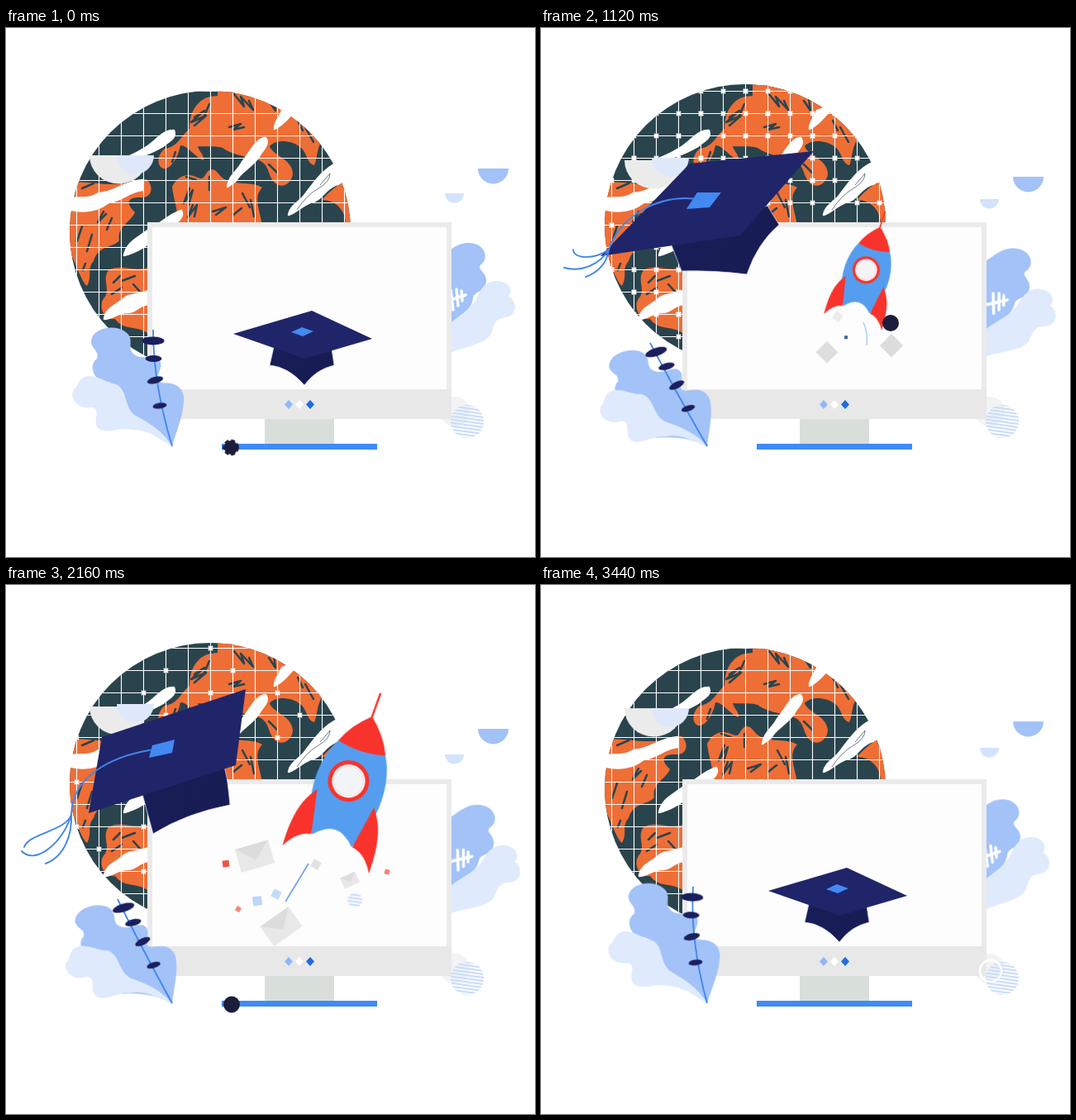
Recreate the animation shown at these times as an HTML page without scripts. Size 640 px wide and 640 px high, loop 3.52 s.

```html
<!DOCTYPE html>
<html lang="en">
<head>
<meta charset="utf-8">
<title>Graduation launch</title>
<style>
html,body{margin:0;width:100%;height:100%;overflow:hidden;background:#fff}
svg{display:block;width:100vw;height:100vh}
.anim{animation:3.52s linear infinite}

/* globe */
.mask{animation-name:mask}
@keyframes mask{0%,79.5%,100%{cy:246px}18.2%{cy:241px}31.8%{cy:238px}50%{cy:237px}61.4%{cy:240px}}
.marks{animation-name:marks}
.marks.late{animation-name:late}
@keyframes marks{0%,9%,46%,100%{opacity:0}15%,38%{opacity:1}}
@keyframes late{0%,14%,76%,100%{opacity:0}22%,66%{opacity:1}}

/* floating bowls */
.bowl{animation-name:bowl}
.bowl.lead{animation-name:lead}
@keyframes bowl{0%,100%{transform:translateY(154px)}18.2%{transform:translateY(161px)}31.8%{transform:translateY(160px)}50%{transform:translateY(153px)}61.4%{transform:translateY(147px)}79.5%{transform:translateY(144px)}97.7%{transform:translateY(149px)}}
@keyframes lead{0%,100%{transform:translateY(154px)}18.2%{transform:translateY(161px)}31.8%{transform:translateY(157px)}50%{transform:translateY(148px)}61.4%,79.5%{transform:translateY(144px)}97.7%{transform:translateY(149px)}}
.bob{animation-name:bob}
.bob.small{animation-name:bobSmall}
@keyframes bob{0%,100%{transform:translateY(170px)}18.2%{transform:translateY(177px)}31.8%{transform:translateY(180px)}50%{transform:translateY(178px)}61.4%{transform:translateY(174px)}79.5%{transform:translateY(164px)}97.7%{transform:translateY(165px)}}
@keyframes bobSmall{0%,100%{transform:translateY(200px)}18.2%{transform:translateY(205px)}31.8%,50%{transform:translateY(207px)}61.4%{transform:translateY(205px)}79.5%{transform:translateY(198px)}97.7%{transform:translateY(197px)}}

/* leaves: --a scales the swing, --s the squash */
.leaf{--a:1;--s:0;transform-origin:201px 506px;animation-name:sway;animation-timing-function:ease-in-out}
.back{--a:.72}
.front{--a:.85;--s:.08}
@keyframes sway{
0%,100%{transform:rotate(0deg) scaleY(1)}
18.2%{transform:rotate(calc(var(--a)*-9deg)) scaleY(calc(1 - var(--s)*.7))}
31.8%,50%{transform:rotate(calc(var(--a)*-13deg)) scaleY(calc(1 - var(--s)))}
61.4%{transform:rotate(calc(var(--a)*-12deg)) scaleY(calc(1 - var(--s)*.9))}
79.5%{transform:rotate(calc(var(--a)*-9.5deg)) scaleY(calc(1 - var(--s)*.7))}
97.7%{transform:rotate(calc(var(--a)*1.5deg)) scaleY(1)}}
.stalk{fill:none;stroke:#3f86f0;stroke-width:1.8;animation-name:stalk;animation-timing-function:ease-in-out}
@keyframes stalk{
0%,100%{d:path("M178 365Q178 430 201 506")}
18.2%{d:path("M139 375Q165 432 201 506")}
31.8%,50%{d:path("M132 381Q162 438 201 506")}
61.4%{d:path("M135 380Q163 437 201 506")}
79.5%{d:path("M145 376Q167 432 201 506")}
97.7%{d:path("M184 365Q180 430 201 506")}}
.bush{transform-origin:500px 410px;animation-name:bush;animation-timing-function:ease-in-out}
@keyframes bush{0%,100%{transform:rotate(0deg)}18.2%{transform:rotate(4.5deg)}31.8%,50%{transform:rotate(5.7deg)}61.4%{transform:rotate(5.2deg)}79.5%{transform:rotate(1deg)}97.7%{transform:rotate(-.6deg)}}

/* rocket */
.rocket{animation-name:launch}
@keyframes launch{
0%,13%,93%,100%{transform:translate(361px,392px) rotate(0deg) scale(0)}
18.2%{transform:translate(363px,361px) rotate(3deg) scale(.4)}
31.8%{transform:translate(395px,294px) rotate(16deg) scale(.66)}
50%{transform:translate(418px,252px) rotate(16deg) scale(.88)}
61.4%{transform:translate(417px,239px) rotate(18deg) scale(1)}
79.5%{transform:translate(405px,262px) rotate(13deg) scale(.92);animation-timing-function:ease-in}}

/* cap */
.board{fill:#20256a;animation-name:board}
@keyframes board{
0%,8%,95.5%,100%{d:path("M275 370L370 342 443 376 361 400Z")}
18.2%,87%{d:path("M169 320L280 256 391 270 304 330Z")}
31.8%{d:path("M72 276L180 164 330 149 241 251Z")}
50%{d:path("M76 276L145 162 311 129 238 249Z")}
61.4%{d:path("M100 276L116 184 290 126 278 218Z")}
79.5%{d:path("M90 276L222 180 349 182 226 275Z")}}
.skirt{fill:url(#dusk);stroke:#d3d6ee;stroke-width:.8;animation-name:skirt}
@keyframes skirt{
0%,8%,95.5%,100%{d:path("M324 386L319 408Q342 410 361 432 375 413 397 408L394 388Z")}
18.2%,87%{d:path("M237 324L236 353Q265 355 299 369 318 340 342 326L333 310Z")}
31.8%{d:path("M158 263L170 294Q208 293 249 298 262 260 288 238L274 215Z")}
50%{d:path("M155 260L166 291Q210 285 257 281 262 250 271 222L262 207Z")}
61.4%{d:path("M165 253L178 301Q218 276 271 266 269 245 267 232L264 219Z")}
79.5%{d:path("M178 273L183 308Q225 316 259 318 278 282 302 260L288 230Z")}}
.knob{fill:#4389f3;animation-name:knob}
@keyframes knob{
0%,8%,95.5%,100%{d:path("M345 368L358 362 372 367 359 373Z")}
18.2%,87%{d:path("M259 296L272 286 295 285 282 296Z")}
31.8%{d:path("M176 219L189 199 218 199 204 217Z")}
50%{d:path("M168 211L180 193 207 187 194 205Z")}
61.4%{d:path("M173 209L177 194 204 187 201 203Z")}
79.5%{d:path("M197 234L212 219 237 219 222 234Z")}}
.cord path{fill:none;stroke:#4285e8;stroke-width:1.9;stroke-linecap:round}
.cord{animation-name:cord}
@keyframes cord{0%,9%,95%,100%{opacity:0}12%,92%{opacity:1}}
.thread{animation-name:thread}
@keyframes thread{
0%,8%,95.5%,100%{d:path("M358 367C358 367 358 367 358 367")}
18.2%,87%{d:path("M277 291C265 276 246 272 236 276")}
31.8%{d:path("M196 208C140 198 95 230 82 268")}
50%{d:path("M188 198C130 205 85 235 77 276")}
61.4%{d:path("M188 198C140 203 80 225 79 278")}
79.5%{d:path("M217 226C165 215 125 235 105 264")}}
.s1{animation-name:s1}.s2{animation-name:s2}.s3{animation-name:s3}
@keyframes s1{
0%,8%,95.5%,100%{d:path("M358 367C358 367 358 367 358 367")}
18.2%,87%{d:path("M236 276C230 277 228 268 237 266")}
31.8%{d:path("M82 268C72 285 50 296 28 290")}
50%{d:path("M77 276C72 300 20 314 20 304")}
61.4%{d:path("M79 278C72 298 28 300 22 317")}
79.5%{d:path("M105 264C95 288 75 282 69 270")}}
@keyframes s2{
0%,8%,95.5%,100%{d:path("M358 367C358 367 358 367 358 367")}
18.2%,87%{d:path("M236 276C230 277 228 268 237 266")}
31.8%{d:path("M82 268C65 280 40 280 39 268")}
50%{d:path("M77 276C70 310 32 338 17 318")}
61.4%{d:path("M79 278C70 310 36 340 19 322")}
79.5%{d:path("M105 264C98 270 78 260 68 276")}}
@keyframes s3{
0%,8%,95.5%,100%{d:path("M358 367C358 367 358 367 358 367")}
18.2%,87%{d:path("M236 276C230 277 228 268 237 266")}
31.8%{d:path("M82 268C80 285 68 296 54 301")}
50%{d:path("M77 276C78 295 68 322 44 333")}
61.4%{d:path("M79 278C80 300 72 328 48 337")}
79.5%{d:path("M105 264C126 260 115 290 88 287")}}

/* debris: --x --y is the place reached 480 ms after the delay */
.bit{opacity:0;animation-name:fly;animation-delay:var(--t)}
@keyframes fly{
0%{transform:translate(388px,322px) rotate(70deg) scale(.2);opacity:0}
5%{opacity:1}
13.6%{transform:translate(var(--x),var(--y)) rotate(0deg) scale(1);opacity:1}
24%{transform:translate(var(--x),calc(var(--y) + 26px)) rotate(-30deg) scale(.8);opacity:0}
100%{opacity:0}}
.b2{--t:640ms}.b3{--t:1280ms}.b4{--t:1680ms}.b5{--t:2320ms}

/* popping dots, fully grown 80 ms after the delay */
.pop{opacity:0;transform-box:fill-box;transform-origin:center;animation-name:pop;animation-delay:var(--t)}
@keyframes pop{0%{opacity:1;transform:scale(.3)}2.2%,5%{opacity:1;transform:scale(1)}6.8%{opacity:1;transform:scale(.7)}6.9%,100%{opacity:0;transform:scale(0)}}
.ink{fill:#1b1d3a}
.burst{stroke:#1b1d3a;stroke-width:3;stroke-dasharray:5 3}
</style>
</head>
<body>
<svg viewBox="0 0 640 640">
<defs>
  <clipPath id="disc"><circle class="anim mask" cx="247" cy="246" r="170"/></clipPath>
  <pattern id="grid" x="72" y="63" width="27" height="27" patternUnits="userSpaceOnUse">
    <path d="M13.5 0V27M0 13.5H27" stroke="#fff" stroke-width="1.1"/>
  </pattern>
  <pattern id="cross" x="72" y="63" width="27" height="27" patternUnits="userSpaceOnUse">
    <path d="M11 11l5 5m0-5l-5 5" stroke="#fff" stroke-width="2"/>
  </pattern>
  <pattern id="cross2" x="72" y="63" width="81" height="54" patternUnits="userSpaceOnUse">
    <path d="M11 11l5 5m0-5l-5 5M38 38l5 5m0-5l-5 5" stroke="#fff" stroke-width="2"/>
  </pattern>
  <pattern id="hatch" width="8" height="4" patternUnits="userSpaceOnUse" patternTransform="rotate(8)">
    <path d="M0 2H8" stroke="#c9dcfa" stroke-width="2.2"/>
  </pattern>
  <linearGradient id="dusk"><stop stop-color="#191d57"/><stop offset="1" stop-color="#181c54"/></linearGradient>
  <g id="mail">
    <path d="M-20-14H20V14H-20Z" fill="#e8e8e8"/>
    <path d="M-20-14L0 4 20-14Z" fill="#dcdcdc"/>
  </g>
  <path id="box" d="M-5-5H5V5H-5Z"/>
  <path id="fin" d="M-36 20C-50 38-56 58-55 98Q-43 76-26 74Z"/>
</defs>

<g clip-path="url(#disc)">
  <path fill="#2a444d" d="M70 60H425V420H70Z"/>
  <g fill="#ee6e36">
    <path d="M232 92Q240 82 256 82V60H350Q375 95 388 130C375 140 378 155 373 166 364 164 364 150 356 144 342 134 325 136 319 143 322 154 346 158 347 176 346 188 334 195 326 188 316 180 320 166 306 160 290 155 272 153 262 145 250 142 240 144 232 143 234 150 240 154 239 160 228 156 220 142 211 142 208 158 198 172 190 170 181 166 184 152 192 146 208 144 212 130 222 122 222 108 226 98 232 92Z"/>
    <path d="M201 192C207 180 218 174 232 181 242 186 240 172 249 171 258 172 257 182 270 185 286 190 298 186 310 193 298 205 308 222 310 240H206C210 222 203 210 201 192Z"/>
    <path d="M70 190C90 182 110 190 130 189 145 190 160 183 170 183 180 192 176 206 164 205 144 204 146 214 156 223 150 236 134 240 137 257 130 266 112 262 106 282 97 292 105 300 98 312 90 306 84 280 72 262Z"/>
    <path d="M124 293C140 284 155 297 175 289V372C160 358 144 368 132 352 118 354 110 335 120 325 126 315 116 304 124 293Z"/>
    <path d="M382 208Q400 188 420 180V240H411C412 222 400 208 382 208Z"/>
  </g>
  <g fill="none" stroke="#2a444d" stroke-width="2.5" stroke-linecap="round" stroke-linejoin="round">
    <path d="M276 80l12 15-4-12 15 16-5-11M228 108l12-8-16 14 18-8-14 12M318 88l8 12-2-14M270 120l14-4-9 7 13-3M246 92l-6 14M362 120l10 18M353 112l6 12M318 165l10 10M205 150l-4 12"/>
    <path d="M222 194l-7 18 11-16-5 18M226 214l-6 15 11-15-3 14M246 180v16M250 222l16-5-12 9M286 200l9 17M296 208l4 20M275 226l10-8M218 180l12 4"/>
    <path d="M92 194l14-6M92 240l-6 18M118 222l-7 13 10-10M128 230l-6 14M104 250l-6 20M140 306l16-6M128 322l12-8M154 310l9 10M138 300l-8 8M96 285l-3 8"/>
  </g>
  <path fill="url(#grid)" d="M70 60H425V420H70Z"/>
  <path class="anim marks" fill="url(#cross)" d="M70 60H425V420H70Z"/>
  <path class="anim marks late" fill="url(#cross2)" d="M70 60H425V420H70Z"/>
</g>
<g fill="#fff" stroke="#fff" stroke-width="2.5" stroke-linejoin="round">
  <path d="M138 160C158 152 165 148 173 142 184 134 190 124 203 124 207 134 196 137 190 143 174 152 160 158 138 160Z"/>
  <path d="M70 207C90 204 100 208 112 200 130 200 142 186 165 184V196C148 198 142 208 124 211 110 222 92 224 72 218Z"/>
  <path d="M268 192C270 178 280 174 286 162 296 150 302 134 314 133 319 140 312 146 308 152 300 168 284 172 278 185Z"/>
  <path d="M342 226C344 214 356 211 363 200 374 186 386 166 412 159 412 176 413 186 398 190 384 196 382 209 368 211 356 216 350 224 342 226Z"/>
  <path d="M143 275C146 260 158 255 170 246 184 240 196 226 212 221 216 228 208 234 200 241 182 248 172 268 143 275Z"/>
  <path d="M119 352C121 338 134 336 143 327 152 320 162 324 174 317V334C160 334 158 345 144 344 134 345 128 352 119 352Z"/>
  <path d="M325 122C325 112 332 108 334 100 342 98 346 94 352 91L350 100C342 106 340 114 325 122Z"/>
</g>
<path d="M352 220q12-18 26-26t14-18M380 190l12-14" fill="none" stroke="#2a444d" stroke-width=".7"/>

<path class="anim bowl" d="M101 0H172A35 34 0 0 1 101 0Z" fill="#ebebec"/>
<path class="anim bowl lead" d="M134 0H179A22.5 22.5 0 0 1 134 0Z" fill="#dfe8fb"/>
<path class="anim bob" d="M571 0H608A18.5 18.5 0 0 1 571 0Z" fill="#a2c2f8"/>
<path class="anim bob small" d="M531 0H554A11.5 11.5 0 0 1 531 0Z" fill="#d3e3fc"/>

<g class="anim bush">
  <path fill="#a2c2f8" d="M500 410V290C530 285 535 260 560 260 578 260 584 276 577 284 566 292 582 294 581 306 580 320 566 318 565 327 562 346 546 346 536 364Z"/>
  <path fill="#dfeafd" d="M500 410C530 350 552 352 564 334 572 328 572 308 592 306 607 305 615 317 608 325 617 328 621 347 605 350 592 352 592 356 588 366 584 386 550 382 500 410Z"/>
  <path d="M532 331L556 323M538 317l3 24M545 316l2 20M551 318l1 12" fill="none" stroke="#fff" stroke-width="3.5" stroke-linecap="round"/>
</g>

<circle cx="543" cy="464" r="18" fill="#f3f3f3"/>
<circle cx="558" cy="476" r="20" fill="url(#hatch)"/>

<path fill="#ebebeb" d="M171 235H539V473H171Z"/>
<path fill="#fdfdfd" d="M177 241H533V437H177Z"/>
<path fill="#e8e8e8" d="M171 437H539V473H171Z"/>
<path fill="#d8dfdb" d="M313 473H397V503H313Z"/>
<path fill="#408af8" d="M261 503H449V510H261Z"/>
<path fill="#8fb8f8" d="M342 450l5 5.5-5 5.5-5-5.5Z"/>
<path fill="#fff" d="M355 450l5 5.5-5 5.5-5-5.5Z"/>
<path fill="#1d6de0" d="M368 450l5 5.5-5 5.5-5-5.5Z"/>

<path class="anim leaf front" fill="#a2c2f8" d="M201 506C206 488 216 466 215 446 212 428 196 430 188 429 176 424 192 412 186 402 180 392 164 404 154 394 146 388 156 376 145 368 132 358 106 362 103 378 102 388 114 390 110 400 102 406 104 416 110 424 118 430 130 424 135 440 140 450 132 468 142 482 158 484 184 490 201 506Z"/>
<path class="anim leaf back" fill="#dfeafd" d="M201 506C190 488 174 478 157 469 142 460 148 438 133 431 122 430 112 420 100 421 86 422 88 436 82 437 76 448 86 462 104 459 116 462 104 475 111 484 122 492 138 483 152 486 176 486 186 499 201 506Z"/>
<path class="anim stalk" d="M178 365Q178 430 201 506"/>
<g fill="#1b1f5e">
  <g class="anim leaf" style="--a:1.4"><ellipse cx="178" cy="378.5" rx="13.5" ry="5"/></g>
  <g class="anim leaf" style="--a:1.15"><ellipse cx="178.5" cy="400" rx="10" ry="4"/></g>
  <g class="anim leaf" style="--a:.93"><ellipse cx="180.5" cy="426" rx="10" ry="4" transform="rotate(-15 180.5 426)"/></g>
  <g class="anim leaf" style="--a:.74"><ellipse cx="186" cy="457" rx="8.5" ry="3.6" transform="rotate(-8 186 457)"/></g>
</g>

<g class="anim bit b2" style="--x:346px;--y:392px"><use href="#box" fill="#dedede" transform="rotate(45) scale(1.9)"/></g>
<g class="anim bit b2" style="--x:424px;--y:384px"><use href="#box" fill="#dcdcdc" transform="rotate(45) scale(2)"/></g>
<g class="anim bit b2" style="--x:359px;--y:349px"><use href="#box" fill="#ececec" transform="rotate(35)"/></g>
<g class="anim bit b2" style="--x:369px;--y:374px"><use href="#box" fill="#3f5f9f" transform="scale(.4)"/></g>
<g class="anim bit b2" style="--x:393px;--y:369px"><path d="M-3-13Q3 0 1 15" fill="none" stroke="#a9c8f6" stroke-width="1.5"/></g>

<g class="anim bit b3" style="--x:299px;--y:367px"><use href="#mail" transform="rotate(-18) scale(.9)"/><use href="#box" fill="#f0a58e" transform="translate(10) scale(.6)"/></g>
<g class="anim bit b3" style="--x:297px;--y:327px"><use href="#box" fill="#f5ada0" transform="rotate(40) scale(.8)"/></g>
<g class="anim bit b3" style="--x:348px;--y:342px"><use href="#box" fill="#eff4fc" transform="rotate(-30) scale(2 1.2)"/></g>
<g class="anim bit b3" style="--x:375px;--y:351px"><use href="#box" fill="#6b7089" transform="rotate(25) scale(.5)"/></g>
<g class="anim bit b3" style="--x:401px;--y:360px"><use href="#mail" transform="rotate(-30) scale(.45)"/></g>
<g class="anim bit b3" style="--x:400px;--y:359px"><path d="M2-22Q1 5-2 23" fill="none" stroke="#7fabf0" stroke-width="1.5"/></g>

<g class="anim bit b4" style="--x:301px;--y:328px"><use href="#mail" transform="rotate(-16) scale(1.05)"/></g>
<g class="anim bit b4" style="--x:333px;--y:413px"><use href="#mail" transform="rotate(-35) scale(1.05)"/></g>
<g class="anim bit b4" style="--x:416px;--y:357px"><use href="#mail" transform="rotate(-25) scale(.5)"/></g>
<g class="anim bit b4" style="--x:266px;--y:337px"><use href="#box" fill="#ec5443" transform="rotate(-8) scale(.8)"/></g>
<g class="anim bit b4" style="--x:281px;--y:392px"><use href="#box" fill="#f4897c" transform="rotate(30) scale(.6)"/></g>
<g class="anim bit b4" style="--x:461px;--y:347px"><use href="#box" fill="#f28274" transform="rotate(15) scale(.6)"/></g>
<g class="anim bit b4" style="--x:304px;--y:382px"><use href="#box" fill="#bcd5fa" transform="rotate(-8) scale(1.1)"/></g>
<g class="anim bit b4" style="--x:327px;--y:374px"><use href="#box" fill="#c4daf9" transform="rotate(25)"/></g>
<g class="anim bit b4" style="--x:375px;--y:338px"><use href="#box" fill="#e2e2e2" transform="rotate(30)"/></g>
<g class="anim bit b4" style="--x:422px;--y:381px"><circle r="9" fill="url(#hatch)"/></g>
<g class="anim bit b4" style="--x:352px;--y:360px"><path d="M14-23L-14 23" stroke="#5f97ee" stroke-width="1.6"/></g>

<g class="anim bit b5" style="--x:505px;--y:348px"><use href="#box" fill="#a9c8f8" transform="rotate(25) scale(.9)"/></g>
<g class="anim bit b5" style="--x:397px;--y:400px"><use href="#box" fill="#f7bdb6" transform="rotate(25) scale(.8)"/></g>
<g class="anim bit b5" style="--x:427px;--y:408px"><use href="#box" fill="#d5e3fa" transform="scale(.7)"/></g>
<g class="anim bit b5" style="--x:393px;--y:366px"><path d="M1-15L0 15" stroke="#94bbf5" stroke-width="1.5"/></g>
<g class="anim bit b5" style="--x:361px;--y:397px"><path d="M2-8L-2 8" stroke="#8cb5f4" stroke-width="1.5"/></g>

<g class="anim rocket">
  <path d="M0-82L1-114" stroke="#f8332c" stroke-width="2.5"/>
  <path fill="#559eef" d="M-30-44C-50-8-44 42-25 74Q0 46 25 74C44 42 50-8 30-44Z"/>
  <path fill="#f8332c" d="M0-84Q-21-66-30-44 0-36 30-44 21-66 0-84Z"/>
  <g fill="#f8332c"><use href="#fin"/><use href="#fin" transform="scale(-1 1)"/></g>
  <circle cx="-3" cy="-1" r="21.5" fill="#f3f4f8" stroke="#f8332c" stroke-width="7"/>
  <circle cx="-3" cy="-1" r="19" fill="none" stroke="#fff" stroke-width="2"/>
</g>

<path class="anim skirt" d="M324 386L319 408Q342 410 361 432 375 413 397 408L394 388Z"/>
<path class="anim board" d="M275 370L370 342 443 376 361 400Z"/>
<path class="anim knob" d="M345 368L358 362 372 367 359 373Z"/>
<g class="anim cord">
  <path class="anim thread"/>
  <path class="anim s1"/>
  <path class="anim s2"/>
  <path class="anim s3"/>
</g>

<circle class="anim pop ink burst" style="--t:-75ms" cx="272" cy="507.5" r="8.5"/>
<circle class="anim pop ink" style="--t:2080ms" cx="273" cy="507.5" r="10"/>
<circle class="anim pop ink" style="--t:1040ms" cx="423" cy="357" r="10"/>
<circle class="anim pop ink burst" style="--t:2650ms" cx="423" cy="357" r="8.5"/>
<circle class="anim pop ink" style="--t:2720ms" cx="552" cy="226" r="10"/>
<circle class="anim pop" style="--t:560ms" cx="518" cy="397" r="9" fill="#fff" stroke="#dc3b2f" stroke-width="1.8"/>
<circle class="anim pop" style="--t:1680ms" cx="545" cy="466" r="13" fill="none" stroke="#fff" stroke-width="2.5"/>
<circle class="anim pop" style="--t:3350ms" cx="544" cy="467" r="13" fill="none" stroke="#fff" stroke-width="2.5"/>
</svg>
</body>
</html>
```
